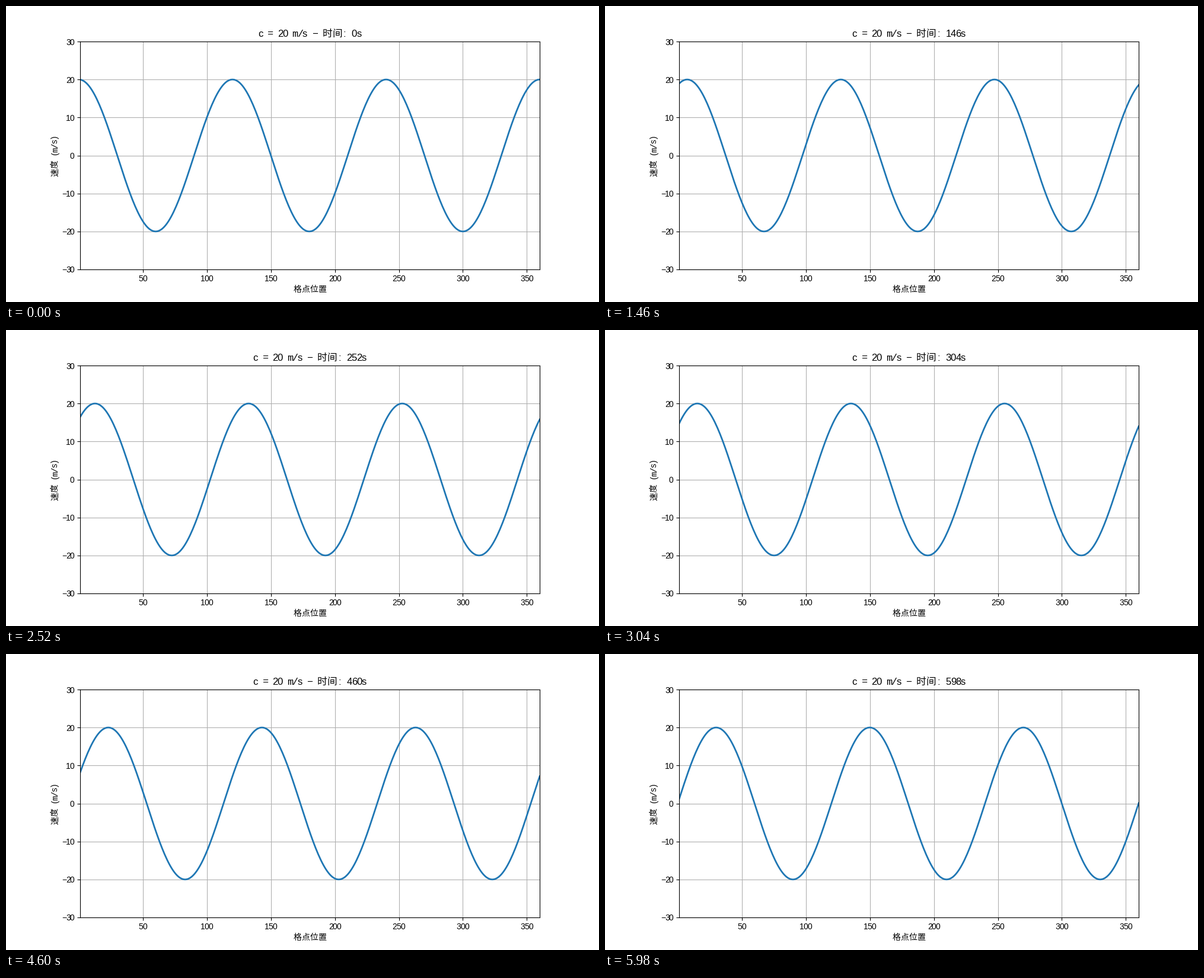
Animation of 1000x500 px, one loop 6000 ms. Source, as a matplotlib script:

```python
import numpy as np
import matplotlib.pyplot as plt
from matplotlib.animation import FuncAnimation

W, H, DPI = 1000, 500, 100
FRAMES, INTERVAL = 300, 20
SANS, MONO, CJK = "Liberation Sans", "Liberation Mono", "Noto Sans CJK JP"

# advance widths in em for the proportional glyphs; other Latin signs use the mono face
SANS_ADVANCE = {**dict.fromkeys("0123456789", 0.556), "c": 0.5, "s": 0.5,
                ":": 0.278, "(": 0.333, ")": 0.333}


def cell_width(ch):
    """Half-width cells for Latin, full-width cells for Chinese."""
    return 1.0 if ord(ch) > 0x2E80 else 0.5


def glyph(ch):
    if cell_width(ch) == 1.0:
        return CJK, 1.0
    if ch in SANS_ADVANCE:
        return SANS, SANS_ADVANCE[ch]
    return MONO, 0.6


def spell(text, x, y, size=10, align=0.5, vertical=False):
    """Set text on a half-width grid; (x, y) is on the baseline, in pixels from the top left."""
    em = size * DPI / 72
    pen = -align * em * sum(map(cell_width, text))
    artists = []
    for ch in text:
        cell = cell_width(ch)
        family, advance = glyph(ch)
        if ch != " ":
            along = pen + em * (cell - advance) / 2
            px, py = (x, y - along) if vertical else (x + along, y)
            artists.append(fig.text(px / W, 1 - py / H, ch, family=family, size=size,
                                    ha="left", va="baseline",
                                    rotation=90 if vertical else 0,
                                    rotation_mode="anchor"))
        pen += em * cell
    return artists


fig, ax = plt.subplots(figsize=(W / DPI, H / DPI), dpi=DPI)
fig.subplots_adjust(left=0.125, right=0.9, bottom=0.11, top=0.88)
ax.set_xlim(1, 360)
ax.set_ylim(-30, 30)
ax.set_xticks(range(50, 351, 50))
ax.set_yticks(range(-30, 31, 10))
ax.tick_params(labelbottom=False, labelleft=False)
ax.grid(True)

for v in range(50, 351, 50):
    spell(str(v), 125 + 775 * (v - 1) / 359, 465)
for v in range(-30, 31, 10):
    spell(str(v).replace("-", "\u2212"), 115.3, 258 - 385 * v / 60, align=1)
spell("格点位置", 512.5, 483)
spell("速度 (m/s)", 87, 253, vertical=True)

grid_x = np.arange(1, 361)
wave, = ax.plot(grid_x, np.zeros(grid_x.size), color="#1f77b4", lw=2)
title = []


def draw(i):
    seconds = 2 * i
    wave.set_ydata(20 * np.cos(2 * np.pi * (grid_x - seconds / 20) / 120))
    for t in title:
        t.remove()
    title[:] = spell(f"c = 20 m/s \u2212 时间: {seconds}s", 512.5, 52, size=12)
    return [wave, *title]


anim = FuncAnimation(fig, draw, frames=FRAMES, interval=INTERVAL,
                     init_func=lambda: draw(0), repeat=True, repeat_delay=0)
plt.show()
```
